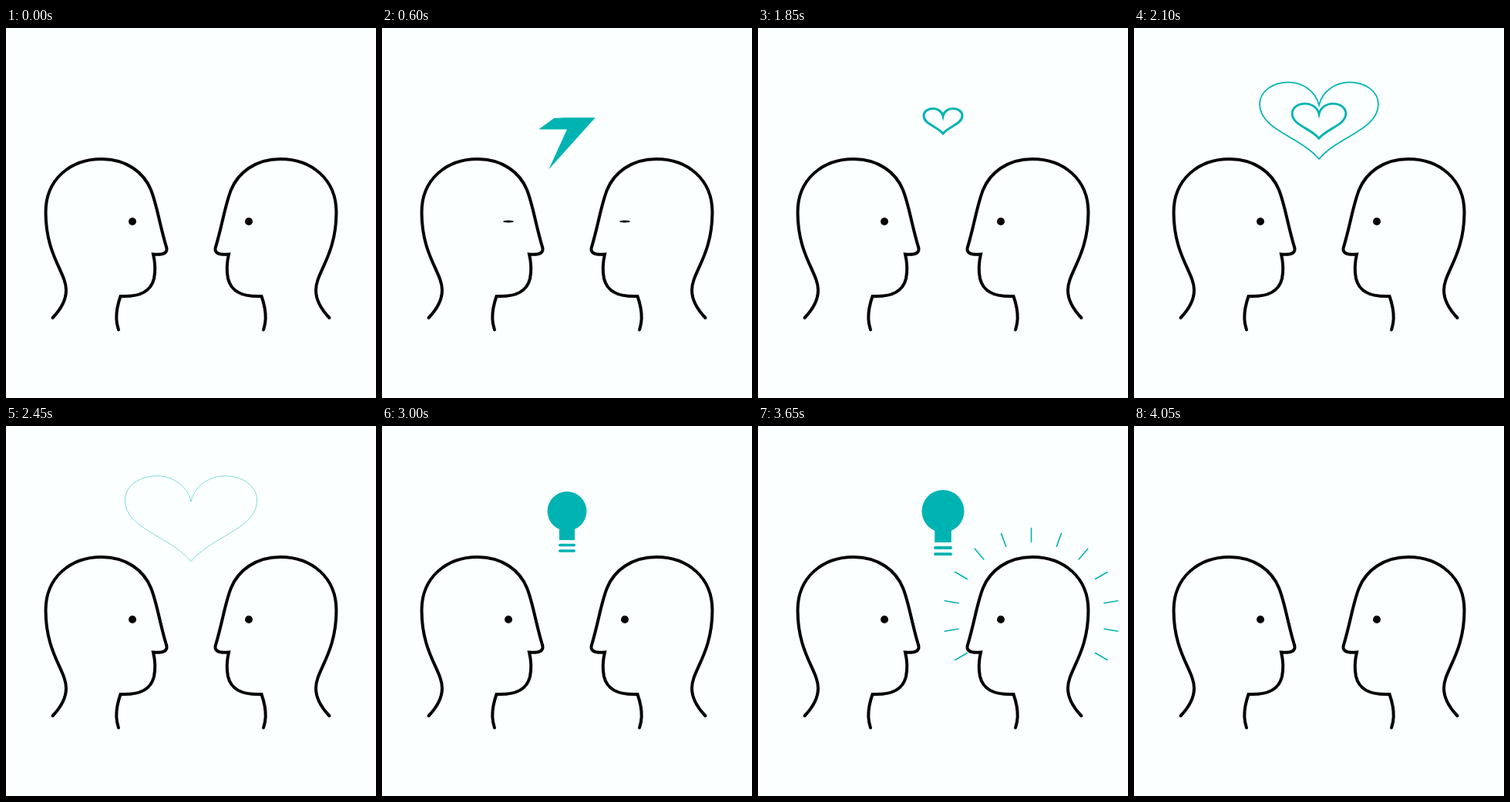
An HTML page with a canvas for the animation above (4550 ms loop, 480 by 480 pixels).

```html
<!DOCTYPE html>
<html>
<head>
<meta charset="utf-8">
<style>
html, body { margin: 0; width: 100%; height: 100%; overflow: hidden; background: #fcffff; }
canvas { display: block; width: 480px; height: 480px; }
</style>
</head>
<body>
<canvas id="stage" width="480" height="480"></canvas>
<script>
const ctx = document.getElementById('stage').getContext('2d');
const LOOP = 4550, STEP = 50, TEAL = '#00b3b3', BACK = '#fcffff';

const head = new Path2D(`M60.5 376C72 364 78 353 78 340C78 317 51.5 295 51.5 239
  C51.5 196 84 170 124 170C157 170 179 188 188 210C196 230 199 254 208 284
  C210.500 291 205 295 191 293.500C194 306 194 315 192 325C188 342 174 349 148.500 348
  C145 358 143 366 143.300 377C143.500 384 145 388 146 391.500`);
const heart = new Path2D(`M0-9.500C2-18 10-23 18-23C27-23 35-18 35-10C35 5 11 9 0 22.300
  C-11 9-35 5-35-10C-35-18-27-23-18-23C-10-23-2-18 0-9.500Z`);

const mix = (a, b, k) => a + (b - a) * k;
const progress = (t, start, end) => Math.min(1, Math.max(0, (t - start) / (end - start)));
const smooth = k => k * k * (3 - 2 * k);
const easeOut = k => 1 - (1 - k) ** 2;
const thin = k => (1 - k) ** 0.6;

// Eased value through [time, value] pairs
function keyed(t, ...keys) {
  let value = keys[0][1];
  for (let i = 1; i < keys.length; i++) {
    value = mix(value, keys[i][1], smooth(progress(t, keys[i - 1][0], keys[i][0])));
  }
  return value;
}

function placed(x, y, sx, sy, draw) {
  ctx.save();
  ctx.translate(x, y);
  ctx.scale(sx, sy);
  draw();
  ctx.restore();
}

function disc(x, y, rx, ry) {
  ctx.beginPath();
  ctx.ellipse(x, y, rx, ry, 0, 0, 7);
  ctx.fill();
}

function line(x1, y1, x2, y2, width) {
  ctx.lineWidth = width;
  ctx.beginPath();
  ctx.moveTo(x1, y1);
  ctx.lineTo(x2, y2);
  ctx.stroke();
}

function drawPeople(t) {
  ctx.strokeStyle = ctx.fillStyle = '#000';
  ctx.lineWidth = 4;
  ctx.stroke(head);
  placed(480, 0, -1, 1, () => ctx.stroke(head));
  const shut = keyed(t, [0, 0], [250, 1], [1600, 1], [1850, 0]);
  for (const x of [164, 315]) disc(x, 251, mix(5, 7, shut), mix(5, 1.5, shut));
}

function drawBolt(t) {
  const s = keyed(t, [300, 0], [600, 1.08], [800, 1.05], [1050, 1], [1390, 1], [1500, 1.08], [1750, 0]);
  if (!s) return;
  const up = smooth(progress(t, 600, 800));
  const down = mix(0.955, 1, up);
  placed(240, 125, s, s, () => {
    ctx.beginPath();
    ctx.moveTo(mix(-15.7, 19, up), mix(-7.5, -53.5, up));
    ctx.lineTo(-1.5, -8);
    ctx.lineTo(34, -8);
    ctx.lineTo(-23 * down, mix(6, 56.5, down));
    ctx.lineTo(0, 6);
    ctx.lineTo(-34, 6);
    ctx.fill();
  });
}

function drawHearts(t) {
  for (const start of [1774, 1990]) {
    const k = progress(t, start, start + 480);
    if (k <= 0 || k >= 1) continue;
    const s = 2.45 * easeOut(k);
    placed(240, 121, s, s, () => {
      ctx.lineWidth = 3.4 * thin(k) / s;
      ctx.stroke(heart);
    });
  }
}

function drawBulb(t) {
  const s = keyed(t, [2580, 0], [2800, 1.12], [3000, 0.925], [3100, 1], [3680, 1], [4010, 0]);
  if (!s) return;
  const drop = keyed(t, [2600, 3.5], [2800, 3.5], [3000, 0]);
  placed(240, 110.5 + drop, s, s, () => {
    disc(0, 0, 27.5, 27.5);
    ctx.fillRect(-10.8, 20, 21.6, 20.5);
    for (const y of [47.5, 55.7]) line(-10, y, 10, y, 3.8);
  });
}

// A fan of lines leaving a head; side 1 is the left head
function burst(t, start, length, side, rays) {
  const k = progress(t, start, start + length);
  if (k <= 0 || k >= 1) return;
  placed(side > 0 ? 125.5 : 354.5, 246.5, side, 1, () => {
    for (const [degrees, reach] of rays) {
      const a = degrees * Math.PI / 180, x = Math.sin(a), y = -Math.cos(a);
      const near = mix(78, reach, k * k), far = mix(78, reach, easeOut(k));
      line(x * near, y * near, x * far, y * far, 3 * thin(k));
    }
  });
}

const ring = Array.from({ length: 13 }, (_, i) => [i * 20 - 120, 118.5]);
const sparks = [[-47, 127], [-23, 140], [0, 149]];

function draw(t) {
  ctx.fillStyle = BACK;
  ctx.fillRect(0, 0, 480, 480);
  ctx.lineCap = 'round';
  drawPeople(t);
  ctx.fillStyle = ctx.strokeStyle = TEAL;
  drawBolt(t);
  burst(t, 620, 450, -1, sparks);
  burst(t, 800, 450, 1, sparks);
  drawHearts(t);
  drawBulb(t);
  for (const start of [3090, 3290]) burst(t, start, 300, 1, ring);
  for (const start of [3250, 3450]) burst(t, start, 300, -1, ring);
}

const begin = performance.now();
function tick() {
  const t = (performance.now() - begin) % LOOP;
  draw(Math.floor(t / STEP) * STEP);
  requestAnimationFrame(tick);
}
tick();
</script>
</body>
</html>
```
